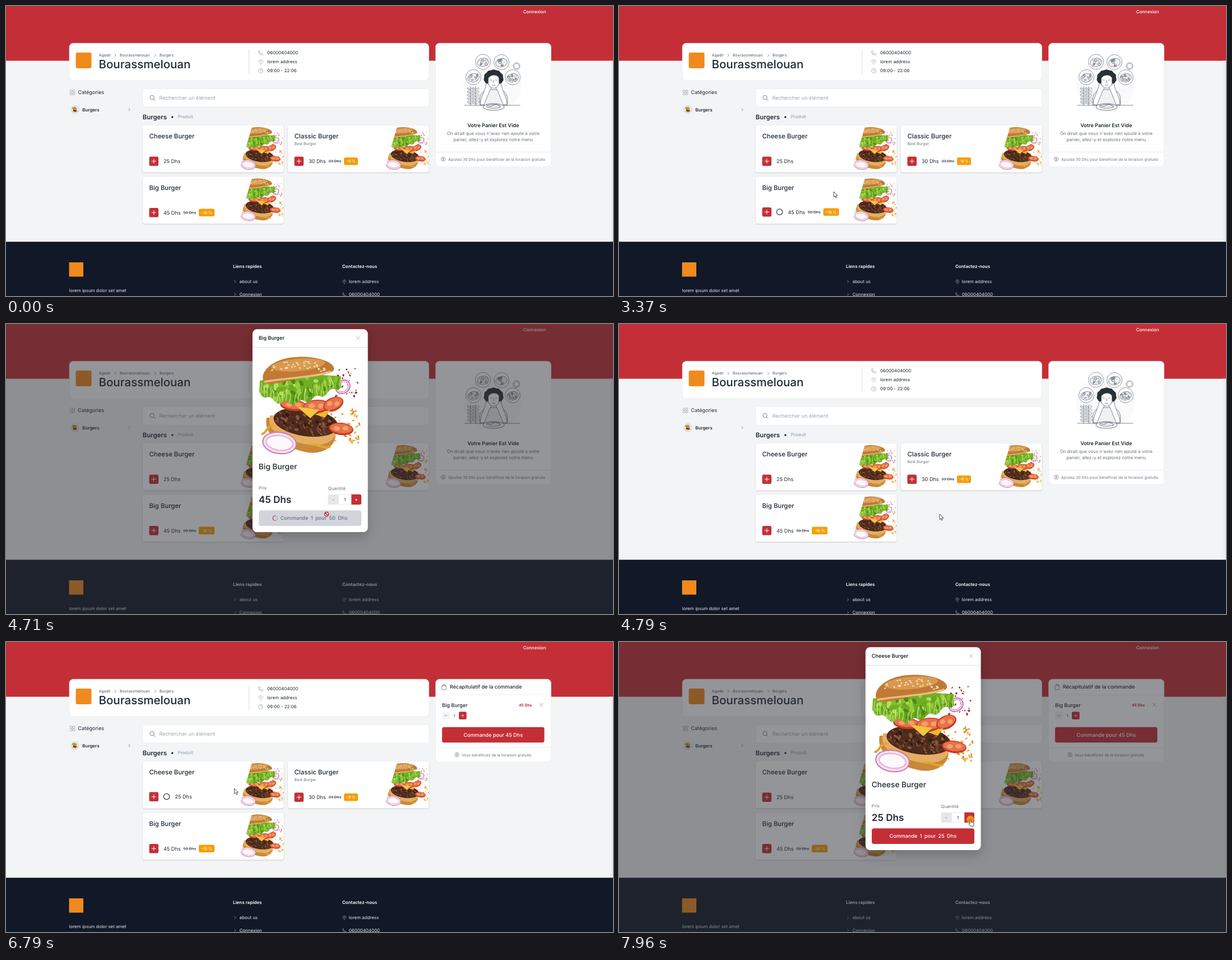
An HTML page that plays this animation: 1083 px wide and 517 px high, repeating every 8 s.

```html
<!DOCTYPE html>
<html lang="fr">
<head>
<meta charset="utf-8">
<title>Commande</title>
<style>
html, body { margin: 0; width: 100%; height: 100%; overflow: hidden; background: #f3f4f6; }
svg { display: block; width: 100vw; height: 100vh; }
text { font-family: Inter, Roboto, "Open Sans", sans-serif; text-rendering: geometricPrecision; white-space: pre; }
.card { fill: #fff; filter: drop-shadow(0 1px 1px rgba(0,0,0,.17)); }
.panel { fill: #fff; stroke: #e5e7eb; stroke-width: .6; }
.line { fill: none; stroke-linecap: round; stroke-linejoin: round; }
.old { text-decoration: line-through; }
.sheet { fill: #fff; filter: drop-shadow(0 8px 10px rgba(0,0,0,.2)); }
.spaced { word-spacing: 2px; }
</style>
</head>
<body>
<svg id="stage" viewBox="0 0 1083 517"></svg>
<script>
const RED = '#c42f37', DARK = '#1f2937', GREY = '#6b7280', PALE = '#9ca3af', AMBER = '#f59e0b';
const SHOP = 'Bourassmelouan', PHONE = '06000404000';
const LOOP = 8000;

let seed = 7;
const rnd = (a = 0, b = 1) => {
  seed = (seed * 16807) % 2147483647;
  return a + (b - a) * seed / 2147483647;
};
const many = (n, fn) => Array.from({ length: n }, (_, i) => fn(i)).join('');
const pick = list => list[Math.floor(rnd(0, list.length))];

// Drawing helpers
const text = (x, y, size, str, fill = DARK, weight = 400, extra = '') =>
  `<text x="${x}" y="${y}" font-size="${size}" fill="${fill}" font-weight="${weight}" ${extra}>${str}</text>`;
const mid = (x, y, size, str, fill, weight, extra = '') =>
  text(x, y, size, str, fill, weight, 'text-anchor="middle" ' + extra);
const rect = (x, y, w, h, r, fill, extra = '') =>
  `<rect x="${x}" y="${y}" width="${w}" height="${h}" rx="${r}" fill="${fill}" ${extra}/>`;
const box = (x, y, w, h, r, cls) =>
  `<rect class="${cls}" x="${x}" y="${y}" width="${w}" height="${h}" rx="${r}"/>`;
const path = (d, fill) => `<path d="${d}" fill="${fill}"/>`;
const line = (d, stroke, width = .8, extra = '') =>
  `<path class="line" d="${d}" stroke="${stroke}" stroke-width="${width}" ${extra}/>`;
const oval = (x, y, rx, ry, fill, turn = 0, extra = '') =>
  `<ellipse cx="${x}" cy="${y}" rx="${rx}" ry="${ry}" fill="${fill}" transform="rotate(${turn} ${x} ${y})" ${extra}/>`;
const ring = (x, y, r, stroke, width = .8, fill = 'none') =>
  `<circle cx="${x}" cy="${y}" r="${r}" fill="${fill}" stroke="${stroke}" stroke-width="${width}"/>`;
const group = (id, body, extra = '') => `<g id="${id}" ${extra}>${body}</g>`;

// Icons
const chevron = (x, y, s, color) => line(`M${x - s / 2} ${y - s}l${s} ${s}l${-s} ${s}`, color);
const cross = (x, y, s, color) => line(`M${x - s} ${y - s}l${2 * s} ${2 * s}m0 ${-2 * s}l${-2 * s} ${2 * s}`, color);
const plus = (x, y, s, width = 1) => line(`M${x - s} ${y}h${2 * s}M${x} ${y - s}v${2 * s}`, '#fff', width);
const pin = (x, y, s, color) =>
  line(`M${x} ${y + 4 * s}C${x - 7 * s} ${y - s} ${x - 2.5 * s} ${y - 4 * s} ${x} ${y - 4 * s}S${x + 7 * s} ${y - s} ${x} ${y + 4 * s}Z`, color, .7) +
  ring(x, y - s, 1.1 * s, color, .7);
const phone = (x, y, s, color) =>
  `<g transform="translate(${x} ${y}) scale(${s})">${line('M-4 -3Q-4 -4 -3 -4H-1.8L-1 -1.4L-2 -.5Q-1 1.4 .6 2L1.5 1L4 1.8V3Q4 4 3 4Q-4 3.5 -4 -3Z', color, .8)}</g>`;
const coin = (x, y) => ring(x, y, 3.7, GREY, .7) + mid(x, y + 2, 5.6, '$', GREY, 500);
const bag = (x, y) => rect(x - 4, y - 2.5, 8, 7.5, 1, 'none', `stroke="${GREY}" stroke-width=".8"`) +
  line(`M${x - 2} ${y - 1}v-2a2 2 0 0 1 4 0v2`, GREY);

function burger() {
  const red = many(34, () => oval(rnd(120, 178), rnd(18, 74), rnd(.8, 2.6), rnd(.8, 1.9), '#a5302a', rnd(0, 180)));
  const gold = many(50, () => oval(rnd(118, 180), rnd(98, 158), rnd(1.2, 4), rnd(.9, 1.8), pick(['#e3a02c', '#d98d1f', '#efb94c']), rnd(0, 180)));
  const meat = many(110, () => {
    const a = rnd(0, 6.28), d = Math.sqrt(rnd());
    return oval(84 + 54 * d * Math.cos(a), 120 + 22 * d * Math.sin(a) + 7 * d * Math.cos(a), rnd(2, 5), rnd(1, 3), pick(['#6e412c', '#33190f', '#8a563b', '#572f20']), rnd(0, 90));
  });
  // Lower rim of the lettuce, u from 0 (left) to 1 (right)
  const rim = u => 66 + 24 * Math.sin(Math.PI * u ** .8) - 10 * u + 3.5 * Math.sin(34 * u);
  const frill = many(38, i => `L${1 + 146 * i / 37} ${rim(i / 37)}`);
  const leaf = many(90, () => {
    const u = rnd(.04, .96), top = 44 - 6 * u;
    return oval(1 + 146 * u, rnd(top, rim(u) - 4), rnd(3, 7), rnd(2, 4.5), pick(['#6aa61f', '#95cf3c', '#4f8a16', '#b3de62', '#83c02e']), rnd(30, 130));
  });
  const curls = many(26, i => {
    const u = (i + .5) / 26;
    return line(`M${1 + 146 * u} ${rim(u) - 1}q${rnd(-3, 3)} -8 ${rnd(-5, 5)} ${rnd(-14, -22)}`, pick(['#d0ec90', '#bfe36f', '#4f8a16']), 1.2);
  });
  const seeds = many(36, () => {
    const u = rnd(-1, 1);
    return oval(72 + 52 * u, 11 + 10 * u * u + rnd(0, 13), 2, 1.1, '#f5e3bd', rnd(-40, 40));
  });
  const tomato = (x, y, rx, ry, a) => oval(x, y, rx, ry, '#c83a22', a) + oval(x, y - 1, rx - 2, ry - 2.5, '#e8714c', a) +
    oval(x - rx * .35, y - 1, rx * .25, ry * .35, '#f3a069', a) + oval(x + rx * .35, y - 1, rx * .25, ry * .35, '#f3a069', a);
  const onion = (x, y, rx, ry, a, w, fill) => oval(x, y, rx, ry, fill, a, `stroke="#cb79b2" stroke-width="${w}"`) +
    oval(x, y, rx - .8, ry - .8, 'none', a, `stroke="#f6e3ef" stroke-width="${w - 2.5}"`) +
    oval(x, y, rx - w * .3, ry - w * .3, 'none', a, 'stroke="#dda5c9" stroke-width="1"');
  return red + gold + onion(150, 57, 12, 10, -35, 5, 'none') +
    path('M14 112C8 140 34 162 82 173C112 180 136 164 137 144L120 112Z', '#ca8838') +
    path('M20 108C12 134 42 152 88 160C116 164 134 154 138 140L120 106Z', '#e5ae62') +
    line('M26 126C12 128 16 138 6 141M32 136C23 144 22 144 12 150M96 160C112 160 114 168 126 164', '#e2a436', 4) +
    oval(84, 120, 58, 25, '#4b2a1d', 8) + meat +
    tomato(62, 90, 24, 10, 5) + tomato(103, 92, 24, 12, -4) + tomato(133, 88, 19, 12, -25) + tomato(147, 132, 22, 11, 6) +
    path('M68 92L108 98L92 113Z', '#f4c53d') + path('M100 106L128 98L118 112Z', '#f0b92f') +
    path(`M2 46${frill}L146 38L80 34Z`, '#72ae25') + leaf + curls +
    path('M8 46C2 28 28 6 66 4C104 1 138 14 134 27C128 36 104 36 72 42C42 48 12 58 8 46Z', '#c17a36') +
    line('M11 48C40 42 100 40 128 30', '#e8bd7d', 3.5) + oval(70, 18, 48, 11, '#d99a50', -5) + seeds +
    onion(37, 157, 27, 16, 8, 8, '#fdf8fb');
}

const photo = (x, y, s, clip = '') =>
  `<g transform="translate(${x} ${y}) scale(${s})" ${clip}><use href="#burger"/></g>`;

function card(id, x, y, title, sub, price, old, off, badgeW) {
  const tag = off ? text(x + 72.2, y + 66, 6.82, old, '#374151', 400, 'class="old"') +
    rect(x + 100, y + 57, badgeW, 13.5, 2.8, AMBER) + mid(x + 100 + badgeW / 2, y + 66.2, 6.82, off, '#fff', 500) : '';
  return box(x, y, 251.5, 83.5, 4, 'card') + photo(x + 172, y + 1.5, .437, 'clip-path="url(#slant)"') +
    text(x + 11.5, y + 23.2, 11.37, title, DARK, 500) + text(x + 11.5, y + 35.3, 7, sub, GREY) +
    group('add' + id, rect(x + 11.5, y + 55.5, 16.5, 16.5, 2.8, RED) + plus(x + 19.75, y + 63.75, 3.7)) +
    group('wait' + id, ring(x + 42.5, y + 62.6, 5.2, '#374151', 1.3)) +
    group('cost' + id, text(x + 37, y + 67.2, 9.1, price, DARK) + tag);
}

function thinker() {
  const ink = '#4b5563', hairInk = '#263238';
  const dish = (x, y) => ring(x, y, 13.5, ink, .6, '#fff') + oval(x, y + 1, 10.5, 7.5, '#f0f1f2', -12, `stroke="${ink}" stroke-width=".6"`) +
    many(9, () => oval(x + rnd(-7, 7), y + rnd(-4, 6), rnd(1.3, 3), rnd(1, 2), pick(['#fff', '#d1d5db', '#9ca3af']), rnd(0, 180), `stroke="${ink}" stroke-width=".5"`));
  const stem = x => line(`M${x} 177V144`, ink, .7) + many(5, i =>
    oval(x - 3, 148 + i * 6, 3.3, 1.6, '#e5e7eb', 30, `stroke="${ink}" stroke-width=".5"`) +
    oval(x + 3, 148 + i * 6, 3.3, 1.6, '#fff', -30, `stroke="${ink}" stroke-width=".5"`));
  const hair = many(15, i => {
    const a = Math.PI * (.85 + 1.3 * i / 14);
    return `<circle cx="${870 + 13 * Math.cos(a)}" cy="${129 + 11 * Math.sin(a)}" r="${i % 2 ? 4.8 : 4}" fill="${hairInk}"/>`;
  });
  return oval(868, 140, 52, 48, '#fafafa') + dish(851, 99.5) + dish(884, 100) + dish(834, 127) + dish(904, 127) +
    ring(911, 107, 6, ink, .6, '#fff') + ring(911, 107, 4.4, ink, .5) +
    stem(829) + stem(838) + line('M818 177H917', ink, .7) +
    `<path d="M846 177C843 160 848 151 861 149H880C892 151 897 160 894 177Z" fill="#f1f2f3" stroke="${ink}" stroke-width=".7"/>` +
    oval(870, 125, 13, 11, hairInk) + hair +
    `<path d="M860.5 129C864 122 876 121 879.5 128V138C878 149 862 149 860.5 138Z" fill="#fff" stroke="${ink}" stroke-width=".6"/>` +
    line('M864 132h2.4M873.5 132h2.4M870 133v4M867.5 141q2.5 2 5 0', ink, .8) +
    `<path d="M857 138C861 139 862 143 866 146L863 151L853 176H846C846 164 855 151 857 138Z" fill="#fff" stroke="${ink}" stroke-width=".7"/>` +
    `<path d="M883 138C879 139 878 143 874 146L877 151L887 176H894C894 164 885 151 883 138Z" fill="#fff" stroke="${ink}" stroke-width=".7"/>` +
    oval(870, 180, 19, 6, '#fff', 0, `stroke="${ink}" stroke-width=".8"`) + oval(870, 179, 13, 3.6, '#e5e7eb', 0, `stroke="${ink}" stroke-width=".6"`) +
    line('M857 176q6 6 12 1t13 3', ink, .7);
}

const defs = () => `<defs>
  <g id="burger">${burger()}</g>
  <clipPath id="slant"><path d="M53 0H183V181H0Z"/></clipPath>
  <linearGradient id="edge"><stop offset="0" stop-color="#f3f4f6"/><stop offset="1" stop-color="#e6e8eb"/></linearGradient>
</defs>`;

const shopHeader = () => rect(0, 0, 1083, 97.6, 0, RED) + rect(1077, 97.6, 6, 323, 0, 'url(#edge)') +
  text(922.7, 12.6, 7.96, 'Connexion', '#fff', 500) +
  box(113, 66.3, 641.5, 66.5, 7, 'panel') + rect(124.5, 83, 28, 28, 3, '#f08a1d') +
  text(165.7, 90.4, 6.82, 'Agadir', '#4b5563') + chevron(195, 88, 2.2, GREY) +
  text(203, 90.4, 6.82, SHOP, '#4b5563') + chevron(266.3, 88, 2.2, GREY) + text(274, 90.4, 6.82, 'Burgers', '#4b5563') +
  text(165.5, 111.4, 20.5, SHOP, DARK, 500) + line('M433.5 78V121', '#d1d5db') +
  phone(454.5, 83.5, 1, PALE) + pin(454.5, 99.6, 1, PALE) + ring(454.5, 115.5, 4, PALE) + line('M454.5 113v2.7h2', PALE) +
  text(466, 86.4, 7.96, PHONE) + text(466, 102.4, 7.96, 'lorem address') + text(466, 118.4, 7.96, '09:00 - 22:06');

const menu = () => many(4, i => rect(114.3 + 4.9 * (i % 2), 149.8 + 4.9 * (i >> 1), 3.6, 3.6, .8, 'none', `stroke="${PALE}" stroke-width=".8"`)) +
  text(128.3, 157.3, 9.1, 'Catégories') +
  ring(123, 184.8, 6.8, PALE, .6, '#fff') + photo(117.8, 179.6, .058) +
  text(136.3, 187.6, 7.96, 'Burgers', DARK, 600) + chevron(220, 184.8, 2.3, GREY) +
  box(244, 147.5, 510.5, 32.5, 4, 'panel') + ring(260.5, 163, 3.7, GREY, .9) + line('M263.2 165.7l2.8 2.8', GREY, .9) +
  text(273.5, 167, 9.1, 'Rechercher un élément', PALE) +
  text(243.8, 201.6, 11.37, 'Burgers', DARK, 600) + `<circle cx="296.8" cy="198" r="1.8" fill="${DARK}"/>` +
  text(306.5, 200.4, 7.96, 'Produit', PALE, 500) +
  card(1, 244, 213, 'Cheese Burger', '', '25 Dhs') +
  card(2, 503, 213, 'Classic Burger', 'Best Burger', '30 Dhs', '33 Dhs', '-9 %', 25) +
  card(3, 244, 304.5, 'Big Burger', '', '45 Dhs', '50 Dhs', '-10 %', 28);

const emptyCart = () => box(766.5, 66.3, 206, 220, 7, 'panel') + thinker() +
  mid(869.3, 215.6, 9.1, 'Votre Panier Est Vide', DARK, 600) +
  mid(869.3, 229.8, 7.96, "On dirait que vous n'avez rien ajouté à votre", GREY) +
  mid(869.3, 241.4, 7.96, 'panier, allez-y et explorez notre menu', GREY) +
  line('M767 260.5H972', '#e5e7eb') + coin(780, 273) +
  text(789, 275.6, 6.82, 'Ajoutez 30 Dhs pour bénéficier de la livraison gratuite', GREY);

const fullCart = () => box(766.5, 66.3, 206, 147.7, 7, 'panel') + bag(781.7, 80) +
  text(791.7, 83.4, 9.1, 'Récapitulatif de la commande', DARK, 500) + line('M767 94H972', '#e5e7eb') +
  text(778, 116, 9.1, 'Big Burger', DARK, 500) + text(915, 114.7, 6.82, '45 Dhs', RED, 700) + cross(955, 111.8, 3, PALE) +
  rect(778, 124.3, 13.7, 13.7, 2.5, '#f3f4f6') + line('M782.5 131.1h4.6', GREY, .7) +
  mid(800, 133.6, 6.82, '1') + rect(808, 124.3, 13.7, 13.7, 2.5, RED) + plus(814.8, 131.1, 2, .7) +
  rect(778, 151.7, 182.5, 27.5, 3.5, RED) + mid(869.2, 168.8, 9.1, 'Commande pour 45 Dhs', '#fff', 500) +
  line('M767 188.3H972', '#e5e7eb') + coin(804.5, 201) + text(813, 203.6, 6.82, 'Vous bénéficiez de la livraison gratuite', GREY);

const footer = () => rect(0, 420.3, 1083, 97, 0, '#111827') + rect(112.5, 457, 25.5, 25.5, 0, '#f08a1d') +
  text(112.5, 510, 7.96, 'lorem ipsum dolor set amet', '#e5e7eb') +
  text(405, 466.7, 7.96, 'Liens rapides', '#fff', 600) + text(600, 466.7, 7.96, 'Contactez-nous', '#fff', 600) +
  chevron(408.7, 491.5, 2.2, PALE) + chevron(408.7, 514.3, 2.2, PALE) +
  text(416.5, 494.2, 7.96, 'about us', '#e5e7eb') + text(416.5, 517, 7.96, 'Connexion', '#e5e7eb') +
  pin(603.7, 491.5, .8, PALE) + phone(603.7, 514.3, .75, PALE) +
  text(611.7, 494.2, 7.96, 'lorem address', '#e5e7eb') + text(611.7, 517, 7.96, PHONE, '#e5e7eb');

const dialog = () => rect(0, 0, 1083, 517, 0, 'rgb(42,44,50)', 'opacity=".5"') +
  box(439.8, 9.3, 205.8, 361.8, 8, 'sheet') + text(450.8, 28.4, 9.1, '', DARK, 600, 'id="head"') +
  cross(628.3, 25.2, 2.9, PALE) + line('M440 41.5H645.5', '#d1d5db') + photo(451, 55, 1) +
  text(450.8, 259, 13.65, '', DARK, 500, 'id="name"') + text(450.8, 295.2, 7.96, 'Prix', GREY) +
  text(450.8, 319.2, 17.06, '', DARK, 600, 'id="price"') + text(574.3, 296.3, 7.96, 'Quantité', GREY) +
  rect(574.5, 303.8, 59.5, 18.2, 3, '#e5e7eb') + rect(612, 303.8, 22, 18.2, 3, RED) +
  rect(593.5, 304.1, 22.5, 17.6, 0, '#fff', 'stroke="#e5e7eb" stroke-width=".6"') +
  mid(583.8, 316, 9.1, '-', GREY) + mid(604.5, 316, 7.96, '1') + mid(625, 316.2, 9.1, '+', '#fff', 500) +
  group('order', rect(451, 332.3, 183, 27.6, 4, RED) + mid(542.3, 349.4, 9.1, '', '#fff', 500, 'id="label" class="spaced"')) +
  group('busy', rect(451, 332.3, 183, 27.6, 4, '#d1d5db') + ring(480.3, 346, 4.2, PALE, 1) +
    line('M480.3 350.2A4.2 4.2 0 0 1 480.3 341.8', '#93393f', 1.1, 'id="arc"') +
    mid(549.3, 349.4, 9.1, 'Commande 1 pour 50 Dhs', GREY, 500, 'class="spaced"'));

const pointer = () => group('glow', `<circle r="6.8" cy=".2" fill="#f59a14" opacity=".88"/>`) +
  group('arrow', '<path d="M0 0V9.6L2.2 7.6L3.8 11L5.4 10.2L3.9 7H6.8Z" fill="#fff" stroke="#222" stroke-width=".8" stroke-linejoin="round"/>') +
  group('hand', '<path d="M-1 1.2A1 1 0 0 1 1 1.2V5L5 5.8Q6.4 6.3 6.2 8L5.3 12.3H.2L-2.9 8.5Q-3.3 7.2 -2.2 7.1L-1 8Z" fill="#fff" stroke="#222" stroke-width=".8" stroke-linejoin="round"/>') +
  group('stop', ring(0, 0, 3.6, '#cc1f36', 1.6, '#fff') + line('M-2.5 -2.5L2.5 2.5', '#cc1f36', 1.5));

document.getElementById('stage').innerHTML = defs() + shopHeader() + menu() + group('empty', emptyCart()) +
  group('full', fullCart()) + footer() + group('dialog', dialog()) + group('pointer', pointer());

const el = {};
document.querySelectorAll('[id]').forEach(e => el[e.id] = e);
const show = (id, on) => el[id].style.display = on ? '' : 'none';
const move = (id, x, y) => el[id].setAttribute('transform', `translate(${x} ${y})`);

// Pointer strokes: first step, last step, number of steps, Bezier points
const strokes = [
  [320, 910, 8, [[972, 498], [700, 330], [330, 268], [188, 330]]],
  [1490, 2260, 10, [[195.5, 343], [290, 420], [465, 392], [387, 338]]],
  [2340, 2340, 1, [[391, 341]]],
  [2510, 2680, 3, [[387, 337], [373, 330], [383, 331]]],
  [3700, 4210, 7, [[393, 332], [480, 334], [572, 339]]],
  [5550, 6060, 7, [[562, 337], [430, 300], [388, 285], [407.5, 261]]],
  [7200, 7780, 8, [[415, 263], [500, 280], [600, 330], [627, 316]]]
];
const clicks = [[2930, 3030], [4460, 4540], [6370, 6460], [7960, LOOP]];

const bezier = (p, u) => p.length < 2 ? p[0] :
  bezier(p.slice(1).map((q, i) => [0, 1].map(k => p[i][k] + (q[k] - p[i][k]) * u)), u);
const ease = u => u * u * (3 - 2 * u);

function pointerAt(t) {
  const [from, to, n, pts] = strokes.filter(s => t >= s[0]).pop() || strokes[0];
  const u = n > 1 ? Math.min(1, Math.floor((t - from) / (to - from) * (n - 1) + .02) / (n - 1)) : 1;
  return bezier(pts, ease(u));
}

function setWaiting(id, on) {
  show('wait' + id, on);
  move('add' + id, 0, on ? -1 : 0);
  move('cost' + id, on ? 20.5 : 0, on ? -1 : 0);
}

function render(t) {
  const within = (a, b) => t >= a && t < b;
  const first = within(3540, 4790), second = t >= 6870, open = first || second;
  const busy = within(4630, 4790);

  setWaiting(1, within(6540, 6870));
  setWaiting(2, false);
  setWaiting(3, within(3200, 3540));
  show('empty', t < 5120);
  show('full', t >= 5120);

  show('dialog', open);
  const item = second ? 'Cheese Burger' : 'Big Burger';
  el.head.textContent = el.name.textContent = item;
  el.price.textContent = second ? '25 Dhs' : '45 Dhs';
  el.label.textContent = `Commande 1 pour ${second ? 25 : 50} Dhs`;
  show('order', !busy);
  show('busy', busy);
  el.arc.setAttribute('transform', `rotate(${Math.floor((t - 4710) / 80) * 40} 480.3 346)`);

  const [x, y] = pointerAt(t);
  const onButton = x > 451 && x < 634 && y > 332.3 && y < 360;
  const onStepper = x > 574 && x < 634 && y > 303.8 && y < 322;
  const hand = open && !busy && (onButton || onStepper);
  show('pointer', t >= 320);
  move('pointer', x, y);
  show('hand', hand);
  show('stop', busy);
  show('arrow', !hand && !busy);
  show('glow', clicks.some(c => within(...c)));
}

const start = performance.now();
function tick(now) {
  render(Math.max(0, now - start) % LOOP);
  requestAnimationFrame(tick);
}
render(0);
requestAnimationFrame(tick);
</script>
</body>
</html>
```
